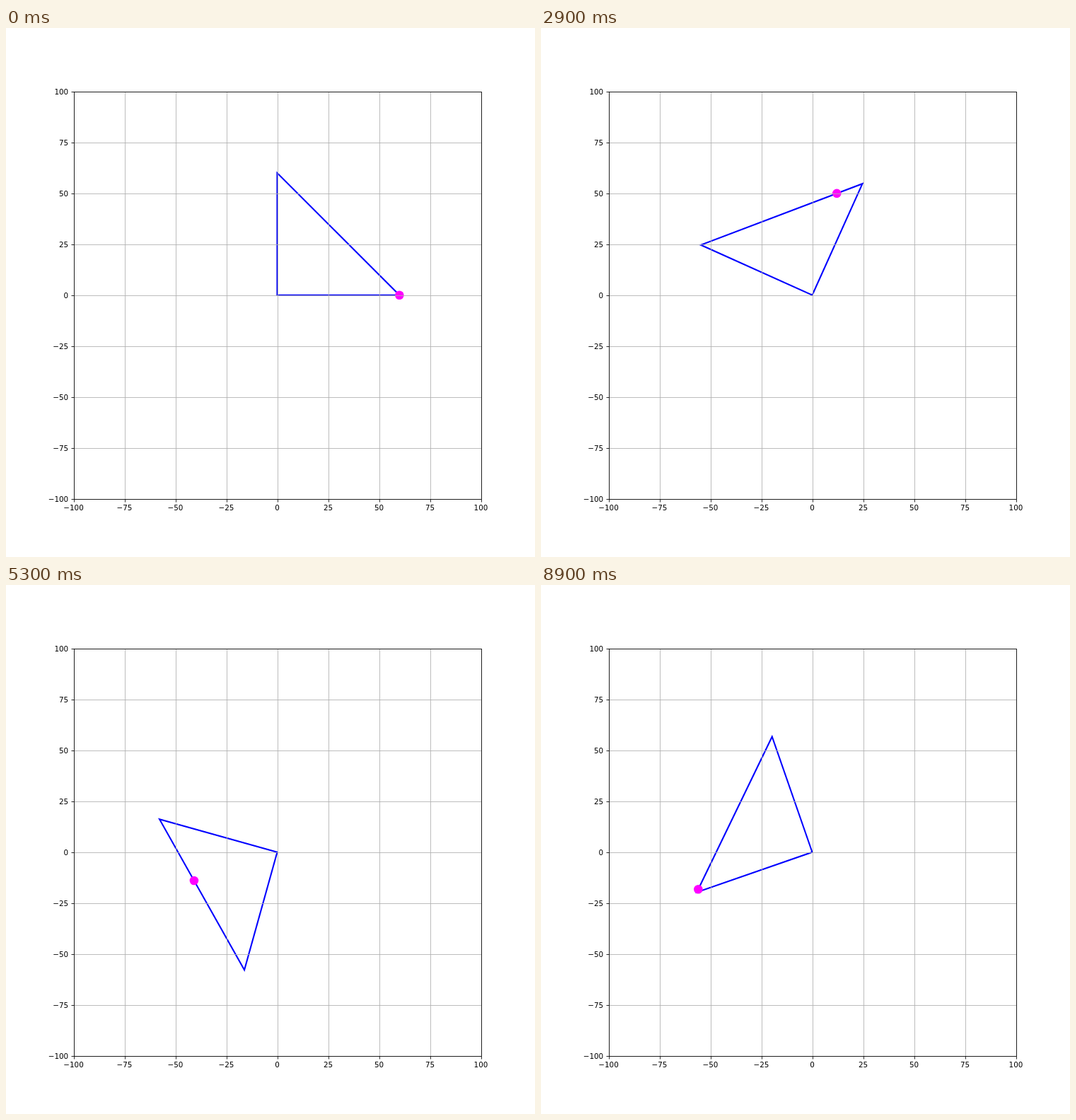
Recreate the animation shown at these times as an HTML page with a canvas. Size 748x748 px, loop 9000 ms.

```html
<!DOCTYPE html>
<html lang="en">
<head>
<meta charset="utf-8">
<title>Rotating triangle</title>
<style>
html, body { margin: 0; width: 100%; height: 100%; overflow: hidden; background: #fff; }
canvas { display: block; }
</style>
</head>
<body>
<canvas id="stage" width="748" height="748"></canvas>
<script>
const ctx = document.getElementById("stage").getContext("2d");
const STEP = 100, STEPS = 90;
const CX = 383.5, CY = 377.74, UNIT = 2.88, ARM = 60;
const LEFT = 96.5, TOP = 90.5, GAP = 72, SIZE = 8 * GAP;
const THIN = 0.83;

const px = x => CX + x * UNIT;
const py = y => CY - y * UNIT;

function segment(x1, y1, x2, y2) {
  ctx.beginPath();
  ctx.moveTo(x1, y1);
  ctx.lineTo(x2, y2);
  ctx.stroke();
}

function drawShape(t) {
  const angle = t + 0.2 * t ** 3;
  const along = (t + t * t) / 12;
  const ax = ARM * Math.cos(angle), ay = ARM * Math.sin(angle);
  const bx = -ay, by = ax;

  ctx.strokeStyle = "#00f";
  ctx.lineWidth = 2.08;
  ctx.lineJoin = "miter";
  ctx.beginPath();
  ctx.moveTo(px(0), py(0));
  ctx.lineTo(px(ax), py(ay));
  ctx.lineTo(px(bx), py(by));
  ctx.closePath();
  ctx.stroke();

  ctx.fillStyle = "#f0f";
  ctx.beginPath();
  ctx.arc(px(ax + (bx - ax) * along), py(ay + (by - ay) * along), 6.3, 0, 2 * Math.PI);
  ctx.fill();
}

// The grid lies over the moving shapes.
function drawAxes() {
  ctx.lineWidth = THIN;
  ctx.strokeStyle = "#b0b0b0";
  for (let i = 0; i <= 8; i++) {
    const d = i * GAP;
    segment(LEFT + d, TOP, LEFT + d, TOP + SIZE);
    segment(LEFT, TOP + d, LEFT + SIZE, TOP + d);
  }

  ctx.strokeStyle = "#000";
  ctx.fillStyle = "#000";
  ctx.font = '10.39px "DejaVu Sans", sans-serif';
  ctx.textBaseline = "alphabetic";
  for (let i = 0; i <= 8; i++) {
    const d = i * GAP;
    const value = i * 25 - 100;
    const label = String(value).replace("-", "\u2212");
    segment(LEFT + d, TOP + SIZE, LEFT + d, TOP + SIZE + 4);
    segment(LEFT - 4, TOP + d, LEFT, TOP + d);
    ctx.textAlign = "center";
    ctx.fillText(label, LEFT - 1 + d, 682);
    ctx.textAlign = "right";
    ctx.fillText(label, 88.2, TOP + SIZE - d + 3.5);
  }
  ctx.strokeRect(LEFT, TOP, SIZE, SIZE);
}

function draw(now) {
  const step = Math.floor(Math.max(0, now) / STEP) % STEPS;
  ctx.fillStyle = "#fff";
  ctx.fillRect(0, 0, 748, 748);
  drawShape(step / 30);
  drawAxes();
}

let start = null;
function tick(now) {
  if (start === null) start = now;
  draw(now - start);
  requestAnimationFrame(tick);
}
draw(0);
requestAnimationFrame(tick);
</script>
</body>
</html>
```
